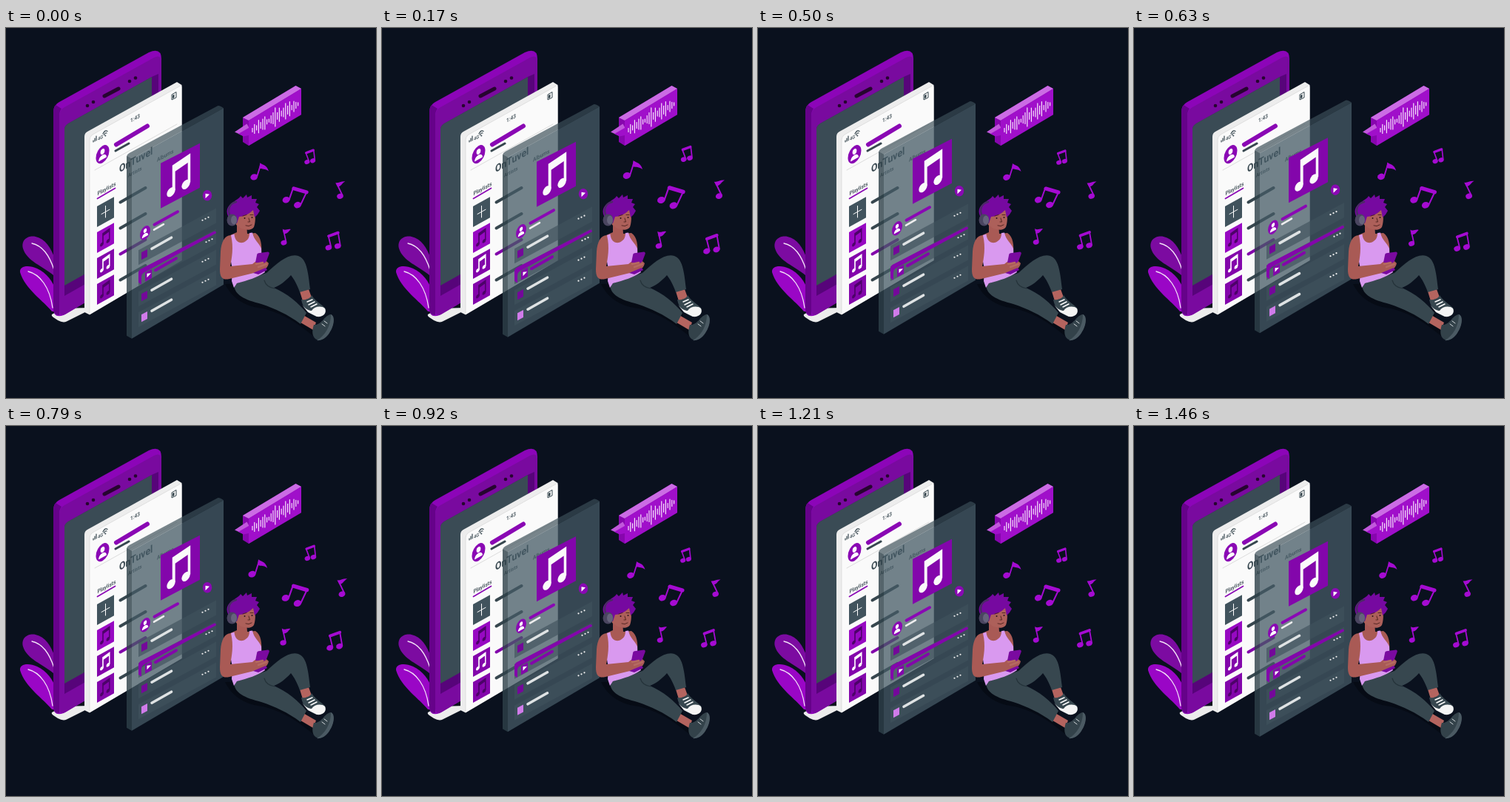
An HTML page for the animation above (1500 ms loop, 500 px wide and 500 px high).

```html
<!DOCTYPE html>
<html lang="en">
<head>
<meta charset="utf-8">
<title>Music app scene</title>
<style>
  html, body { margin: 0; width: 100%; height: 100%; overflow: hidden; background: #0a111e; }
  svg { display: block; width: 100%; height: 100%; }
  text { font-family: Roboto, Inter, sans-serif; fill: #37474f; }
  .line { fill: none; stroke-linecap: round; stroke-linejoin: round; }
</style>
</head>
<body>
<svg viewBox="0 0 500 500">
  <defs>
    <g id="pair">
      <ellipse cx="16" cy="46" rx="6.5" ry="6"/>
      <ellipse cx="39" cy="46" rx="6.5" ry="6"/>
      <path d="M18 11 L46 7 V46 H42 V18 L22.500 21 V46 H18Z"/>
    </g>
    <g id="user">
      <circle r="10" fill="#8a08b4"/>
      <circle cy="-3.2" r="3.2" fill="#fff"/>
      <path d="M-6 6 C-6 -1 6 -1 6 6 Z" fill="#fff"/>
    </g>
  </defs>

  <g id="leaves">
    <path d="M64 334 C50 322 28 315 23 298 C20 286 30 280 40 282 C53 285 61 297 66 312Z" fill="#7c0ba1"/>
    <path d="M62 383 C52 370 25 352 19 330 C18 321 31 320 42 325 C55 331 64 343 67 355 V383Z" fill="#9a06c6"/>
    <path class="line" d="M35 291 C49 294 59 308 65 327 M30 329 C46 333 59 350 63 378" stroke="#f3e3f8" stroke-width="1.300"/>
  </g>

  <g id="phone">
    <path d="M62 387 L78 379 L112 378 L106 384.500 L82 396.500 Q77 399 70 395 L64 391 Q61 389 62 387Z" fill="#ececec"/>
    <path d="M64 114 Q64 104 72 100 L193 33 Q210 26 210 42 V310 L78 388 Q64 393 64 379Z" fill="#8c05b8"/>
    <path d="M64 114 Q64 108 67 104 L75 109 Q72 113 72 119 V388 Q64 388 64 379Z" fill="#66028a"/>
    <path d="M72 119 Q72 111 79 107 L200 40 Q210 35 210 46 V310 L80 387 Q72 390 72 381Z" fill="#790a9f"/>
    <path d="M79 137 Q79 132 84 129 L197 66 L206 62 V290 L79 362Z" fill="#57047a"/>
    <path d="M79 137 Q79 132 84 129 L197 66 V282 L79 348Z" fill="#3a4b55"/>
    <g fill="#26052f">
      <circle cx="110" cy="105" r="2.300"/><circle cx="118" cy="100" r="2.300"/>
      <circle cx="167" cy="72" r="2.300"/><circle cx="175" cy="67.500" r="2.300"/>
    </g>
    <path class="line" d="M133 92 L152 82" stroke="#26052f" stroke-width="5"/>
  </g>

  <g id="card">
    <path d="M106 147 Q106 142 110 140 L231 73 L237.500 77 V314 L113 387.500 L106 384Z" fill="#ededed"/>
    <path d="M113 151 Q113 147 117 144 L234 79 Q237.500 76 237.500 80 V314 L113 387Z" fill="#fafafa"/>
    <path class="line" d="M113 386 V151 Q113 147 117 144 L235 78.500" stroke="#d6d6d6" stroke-width=".7"/>
    <path class="line" d="M118 154 v-2 M120 153 v-4 M122 152 v-6" stroke="#37474f" stroke-width="1.200"/>
    <path class="line" d="M131 143 Q134 137 137 139.500 M132.500 144.500 Q134 141 136 142" stroke="#37474f" stroke-width="1.200"/>
    <circle cx="134.300" cy="145.500" r="1" fill="#37474f"/>
    <path d="M224 90 L230 86.500 V94 L224 97Z" fill="none" stroke="#37474f"/>
    <path d="M225 91 L227.500 89.500 V94 L225 95.500Z" fill="#37474f"/>
    <path class="line" d="M120 192 L231 130" stroke="#dcdcdc"/>
    <use href="#user" transform="matrix(.9 -.5 0 1.150 130.500 170.700)"/>
    <path class="line" d="M149 157.500 L191 132.500" stroke="#8a08b4" stroke-width="6"/>
    <path class="line" d="M148 166 L166 156" stroke="#37474f" stroke-width="3"/>
    <path class="line" d="M123.500 230.500 L147.500 216.500" stroke="#8a08b4" stroke-width="1.700"/>
  </g>

  <g id="glass">
    <path d="M163 175 Q163 171 167 169 L286 105.500 Q288 104.500 294 108.500 L170 177 V420 L163 416Z" fill="#3c4e58" opacity=".68"/>
    <path d="M170 177 L294 108.500 V347 L170 420Z" fill="#455a64" opacity=".75"/>
    <path d="M163 173 L170 177 V420 L163 416Z" fill="#22323b" opacity=".4"/>
    <path d="M209 183 L262 156 V216 L209 244Z" fill="#8306ab"/>
    <use href="#pair" transform="matrix(.874 -.445 0 1 209 183)" fill="#fafafa"/>
    <ellipse cx="272" cy="226.500" rx="6.200" ry="7.300" fill="#8a08b4"/>
    <path d="M269.500 224 L275 225 L269.500 230.500Z" fill="#fff"/>
    <use href="#user" transform="matrix(.7 -.38 0 .9 188 277)"/>
    <path class="line" d="M200.500 266 L232 248.500" stroke="#8a08b4" stroke-width="4"/>
    <path class="line" d="M200 273 L213 265.500" stroke="#eee" stroke-width="2.600"/>
  </g>

  <g id="bubble">
    <path d="M320 121 L391.500 78 L399 82 V117 L328 159 L320 154Z" fill="#8706ae"/>
    <path d="M320 121 L391.500 78 L399 82 L328 125Z" fill="#cb6ce4"/>
    <path d="M328 125 L399 82 V117 L328 159Z" fill="#a00fca"/>
    <path d="M309 140.500 L325.500 129.500 L328 134 V144 L321 146Z" fill="#c158dc"/>
    <path d="M314 143 L328 135 V145 L321 146.500Z" fill="#a00fca"/>
  </g>

  <g id="notes" fill="#a50bd2" stroke="#a50bd2"></g>

  <g id="person">
    <path d="M296 346 C306 367 326 377 347 379 C367 384 385 393 402 406 L420 420 L405 385 L350 345Z" fill="#060b15"/>
    <path d="M397 356 L409 353 L413 364 L401 369Z M400 387 L419 398 L415 408 L393 395Z" fill="#b4645f"/>
    <path d="M308 347 C322 341 344 334 352 331 C366 318 382 304 395 308 C406 312 408 327 411 353 L397 357 C393 346 389 339 385 334 C378 342 370 348 362 351 C380 359 395 371 406 385 L398 400 C381 387 363 379 345 373 C322 367 309 361 308 347Z" fill="#37474f"/>
    <path class="line" d="M349 341 C351 348 356 351 363 352" stroke="#25333a" stroke-width="1.200"/>
    <path d="M399 367 C405 368 411 366 413 361 C419 371 429 374 432 380 C433 386 428 390 420 390 C411 387 401 380 399 367Z" fill="#37474f"/>
    <path d="M413 382 C417 376 426 375 431 379 C434 386 428 391 420 390 L408 384 L400 374 C405 380 409 382 413 382Z" fill="#f4f4f4"/>
    <path class="line" d="M407 370 L414 367 M409 374 L417 370 M412 377 L420 373" stroke="#fff" stroke-width="1.500"/>
    <path d="M416 401 C427 402 430 388 439 387 C445 390 443 402 437 412 C432 420 423 425 417 419 C413 414 414 407 416 401Z" fill="#33424a"/>
    <path d="M439 387 C445 389 444 402 437 412 C432 420 425 423 420 422 C431 416 439 403 439 387Z" fill="#4b5a63"/>
    <path class="line" d="M427 400 L431 403 M430 396 L434 399" stroke="#d5dadd"/>

    <path d="M312 265 H325 L326 278 L337 277 C345 282 346 295 345 304 L338 306 L304 290 L303 280 L312 276Z" fill="#a95a55"/>
    <path d="M304 280 L308.500 278.500 C309 287 314 291 320 290 C326 288 329 284 329 277 L333 276.500 C335 287 342 290 345 298 L346 321 L350 330 C340 337 327 341 312 345 L308 351 L305 342 L306 325 C302 310 302 294 304 280Z" fill="#d999ef"/>
    <path d="M304 280 C295 280 291 290 290 302 L289 326 C289 338 293 341 302 339 L335 331 C344 331 353 327 355 318 C350 311 340 312 333 319 L303 322 C305 311 308 297 304 280Z" fill="#a95a55"/>
    <path d="M339 307 Q339 304 343 304 L354 302.500 Q357 303 355 307 L352 315 Q350 318 346 318 L337 317Z M334 331 L351 324 L353 327 L341 333Z" fill="#7a0aa0"/>
    <path class="line" d="M338 319 L347 317 M341 323 L352 319" stroke="#b56a62" stroke-width="2.500"/>

    <path d="M310 252 C318 250 328 244 335 245 C338 253 337 264 335 269 C331 275 323 272 318 271 L311 266Z" fill="#ad605a"/>
    <path d="M300 254 C296 245 301 238 308 236 C309 232 314 232 317 227 L320 230 L325 225 L326 229 L332 226 L332 231 L339 231 L337 236 L342 238 L339 242 L343 247 L340 252 L336 256 L334 246 C328 252 320 255 315 255 L312 264 L304 263Z" fill="#7609a0"/>
    <path class="line" d="M311 235 C301 237 299 247 303 254" stroke="#4b2a66" stroke-width="2.500"/>
    <ellipse cx="305.500" cy="259.500" rx="7" ry="8" fill="#4a4560"/>
    <ellipse cx="308" cy="259.500" rx="4" ry="6" fill="#66637c"/>
    <g fill="#29151c"><circle cx="322.500" cy="257" r="1"/><circle cx="332.500" cy="256" r="1"/></g>
    <path class="line" d="M320 254 L325 252.500 M330 252.500 L334 252.500 M328 257 L329.500 262 L327 262 M324 267 Q328 269 332 266" stroke="#4c211d" stroke-width=".9"/>
  </g>
</svg>

<script>
const el = id => document.getElementById(id);
const add = (id, markup) => el(id).insertAdjacentHTML('beforeend', markup);
const SLOPE = 0.556;

const line = (x1, y1, x2, y2, color, width) =>
  `<path class="line" d="M${x1} ${y1} L${x2} ${y2}" stroke="${color}" stroke-width="${width}"/>`;
const block = (x, y, w, h, color, slope = SLOPE, extra = '') =>
  `<path d="M${x} ${y} l${w} ${-w * slope} v${h} l${-w} ${w * slope}Z" fill="${color}" ${extra}/>`;
const label = (x, y, size, weight, str) =>
  `<text transform="matrix(.874 -.486 0 1 ${x} ${y})" font-size="${size}" font-weight="${weight}">${str}</text>`;

function buildCard() {
  add('card', label(124, 152.5, 6.5, 500, '4G') + label(168, 128, 7.5, 500, '1:43') +
    label(153, 195.5, 14, 700, 'OnTuvel') + label(123.5, 226.5, 7.5, 500, 'Playlists') +
    label(165, 202, 7, 500, 'Artists') + label(204, 181, 7.5, 500, 'Albums'));
  const tiles = ['#41535d', '#9709c2', '#8306ab', '#8306ab'];
  tiles.forEach((color, i) => {
    const y = 241 + 35 * i;
    const icon = i
      ? `<use href="#pair" transform="matrix(.37 -.206 0 .42 123.500 ${y + 0.5})" fill="${i === 2 ? '#fff' : '#4c0368'}"/>`
      : line(134.5, y - 0.5, 134.5, y + 15, '#fff', 1) + line(129, y + 10.5, 140, y + 4.3, '#fff', 1);
    add('card', block(123, y, 23, 28, color) + icon +
      line(154.5, y - 5.5, 188.5, y - 25, i === 2 ? '#8306ab' : '#37474f', 4));
  });
}

function buildRows() {
  for (let i = 0; i < 4; i++) {
    const y = 306 + 28 * i, active = i === 1, dx = active ? 5 : 0;
    let s = block(179, y - 5.5, 105, 20, '#40525c', 0.54, 'opacity=".65"');
    if (active) {
      s += `<path d="M179 331 Q179 327.500 183 325.500 L281 275 Q284 274 284 277.500 L186 331 Q183 333 183 337 V347 L179 344Z" fill="#8306ab"/>` +
        block(188, 331, 9, 12, '#8306ab', 0.54) +
        `<path d="M190.500 332 L196 331.500 L190.500 337.500Z" fill="#fff"/>` +
        line(202, 327.5, 230, 311.5, '#8306ab', 4);
    } else {
      s += block(183, y - 2.5, 8, 10, i === 3 ? '#d07bea' : '#74089a', 0.54) +
        line(197, y - 7.5, 223.5, y - 22.5, '#dfe3e4', 3.6);
    }
    for (let k = 0; k < 3; k++)
      s += `<circle cx="${265.5 + dx + 4 * k}" cy="${y - 46 + (active ? 1.5 : 0) - 2 * k}" r="1.100" fill="#f4f4f4"/>`;
    add('glass', s);
  }
}

function buildWave() {
  const heights = [5, 12, 6, 17, 8, 14, 17, 6, 4, 10, 15, 25, 9, 18, 7, 12, 21, 11, 19, 6, 14, 8, 4];
  add('bubble', heights.map((h, i) => {
    const x = 333 + 2.8 * i, y = 138 - 1.6 * i;
    return line(x, y - h / 2, x, y + h / 2, '#f7e6fc', 1.2);
  }).join(''));
}

function buildNotes() {
  const head = (x, y, r) =>
    `<ellipse transform="translate(${x} ${y}) rotate(-20)" rx="${r}" ry="${r * 0.82}" stroke="none"/>`;
  const path = (d, w) => `<path class="line" d="${d}" stroke-width="${w}"/>`;
  const flag = d => `<path d="${d}" stroke="none"/>`;
  add('notes',
    head(336, 201.8, 4.9) + path('M340 201 L345 185', 1.8) +
    flag('M344 183 C347 186 353 185 355.500 194 C351 190 347 192 343 190Z') +
    head(378.8, 232.2, 5) + head(394, 239, 5) + path('M382.700 232 L388 217 M398 239 L406 222', 2) +
    path('M389 217 L406 222', 5) +
    head(406.7, 181.7, 3.6) + head(414.3, 180, 3.6) + path('M409.300 181 L405 169.500 M417 179 L415.500 166', 1.6) +
    path('M405.500 169.500 L415 166', 3.2) +
    head(450.7, 227.3, 4.3) + path('M453.700 226 L446.500 211', 1.8) +
    flag('M444.500 209.500 C449 210 452 207 457.500 207.500 C453 210 453 213.500 447.500 215Z') +
    head(375.7, 289.3, 4) + path('M378.700 288 L375.300 273', 1.7) +
    flag('M374 271 C378 274 381 270 385 271.500 C382 274 381 278 375.500 277.500Z') +
    head(435.3, 295.8, 4.3) + head(447.5, 293.8, 4.3) + path('M438.700 295 L435 280 M451 293 L448 276', 1.8) +
    path('M435.500 280.500 L448 276', 3.8));
}

const LOOP = 1500;
// Two beats per loop: [phase, strength]
const BEAT = [[0, 0], [0.1, 1], [0.3, 0], [0.4, 0], [0.5, 1], [0.6, 0], [1, 0]];

function beat(p) {
  const i = BEAT.findIndex(k => k[0] > p);
  const [a, u] = BEAT[i - 1], [b, v] = BEAT[i];
  return u + (v - u) * (p - a) / (b - a);
}

function draw(ms) {
  const p = ((ms + 20) % LOOP) / LOOP;
  const lift = 9 * (1 - Math.abs(1 - 2 * p));
  const scale = 1 + 0.1 * beat(p);
  el('glass').setAttribute('transform', `translate(0 ${-lift})`);
  el('notes').setAttribute('transform', `translate(395 229) scale(${scale}) translate(-395 -229)`);
}

buildCard();
buildRows();
buildWave();
buildNotes();

const start = performance.now();
function tick() {
  draw(performance.now() - start);
  requestAnimationFrame(tick);
}
draw(0);
requestAnimationFrame(tick);
</script>
</body>
</html>
```
